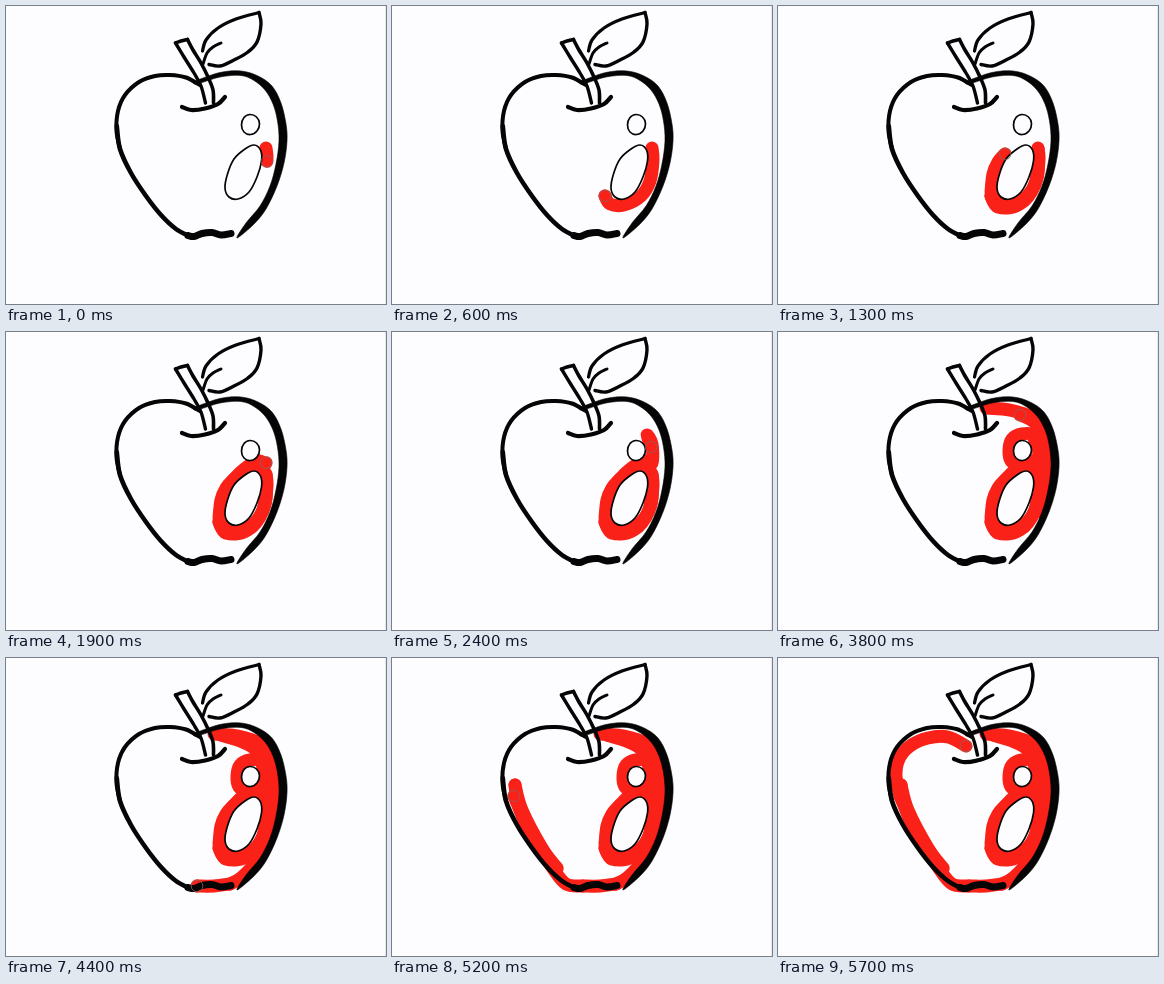
Write an HTML page that moves like this. It is 380 by 298 pixels and loops after 5.8 s.

```html
<!DOCTYPE html>
<html lang="en">
<head>
<meta charset="utf-8">
<title>Colouring an apple</title>
<style>
  html, body { margin: 0; width: 100%; height: 100%; overflow: hidden; background: #fdfcfe; }
  svg { display: block; width: 100%; height: 100%; }
  path { fill: none; stroke-linecap: round; stroke-linejoin: round; }
  #paint path { stroke: #fa2119; stroke-width: 13; }
  #ink path { stroke: #050505; }
  #ink .solid { fill: #050505; stroke-width: .6; }
  #ink .gloss { fill: #fdfcfe; stroke-width: 1.7; }
  #cursor { fill: none; stroke: #8d6260; stroke-width: .8; }
</style>
</head>
<body>
<svg viewBox="0 0 380 298" preserveAspectRatio="none">
  <path d="M379.5 0V298" stroke="#e9e7eb"/>
  <g id="paint"></g>
  <g id="ink"></g>
  <circle id="cursor" r="5.8"/>
</svg>
<script>
const LOOP = 5800, STEP = 100;
const $ = id => document.getElementById(id);

// Smooth curve through a list of points
function curve(text, closed) {
  const p = text.split(' ').map(s => s.split(',').map(Number));
  const n = p.length;
  const at = i => closed ? p[(i + n) % n] : p[Math.max(0, Math.min(n - 1, i))];
  let d = 'M' + p[0];
  for (let i = 0; i < (closed ? n : n - 1); i++) {
    const [a, b, c, e] = [at(i - 1), at(i), at(i + 1), at(i + 2)];
    const h1 = b.map((v, k) => v + (c[k] - a[k]) / 6);
    const h2 = c.map((v, k) => v - (e[k] - b[k]) / 6);
    d += `C${h1} ${h2} ${c}`;
  }
  return d + (closed ? 'Z' : '');
}

function addPath(parent, d, width, cls) {
  const el = document.createElementNS('http://www.w3.org/2000/svg', 'path');
  el.setAttribute('d', d);
  if (width) el.style.strokeWidth = width;
  if (cls) el.setAttribute('class', cls);
  parent.appendChild(el);
  return el;
}

const ink = (text, width) => addPath($('ink'), curve(text), width);
const shape = (text, cls) => addPath($('ink'), curve(text, true), 0, cls);

// Highlights
shape('244,108.5 250.5,111 253.5,117.5 251,125 244.5,128.5 238,126 235.5,119 238,111.5', 'gloss');
shape('239,143 228,153 221.5,168 219,182 223,191 232,193 243,186 251,171 255.5,155 254.5,144 248,139', 'gloss');

// Apple body
ink('194,79 180,71.5 164,69 149,70 133,76 119,89 112,105 110.5,125 114,143', 4);
ink('110.8,120 114,143 125,167 140,190 155,209 170,223 184,230.5', 4.6);
ink('182,229.5 188,230.5 196,227.5 206,226.5 215,229 225,227.5', 7);
shape('190,75 214,66.5 235,65 252,70 266,80 275,97 280,118 281,135 278,157 271,180 260,203 248,218 231,232 ' +
  '240,217 254,200 264,180 270,158 273,135 271.5,115 267,98 259,84 248,74.5 235,69.5 214,71 191,78', 'solid');

// Stem and hollow
ink('169.5,37 175,35 181.5,33.5', 3.6);
ink('169.5,37 178,51 188,67 195,80 199.5,97', 3.4);
ink('181.5,33.5 187,44 195,57 202,71 207,84 207.5,97', 3.6);
ink('176,101 185,104 199,102.5 212,98 219,91', 4.2);

// Leaf
ink('196.5,45 200,34 212,22 230,13 253,6.5', 3.2);
ink('253,6.5 255,18 251,36 242,46 228,54 214,60 203,58.5', 3.4);
ink('197,58 201,47 207,41 215,37', 3);

// Brush strokes: start ms, end ms, points
const strokes = [
  [-100, 600, '260,142 261,154 258,175 249,190 232,199 218,198 213,190'],
  [600, 1100, '213,190 226,201 246,195 259,172 260,143 257,178 240,199 220,201 213,190'],
  [1100, 1300, '213,186 215,168 220,156 227,148'],
  [1300, 1800, '227,148 236,139 247,132 258,139 259,148 257,132 253,129'],
  [1800, 2400, '253,129 260,131 260,112 255,103 259,115'],
  [2400, 2900, '259,115 255,103 244,102 234,107 231,118 233,129 240,133'],
  [3000, 3200, '208,76 225,77 240,80 255,85'],
  [3200, 3600, '255,85 264,98 268,120 268,145 263,180'],
  [3600, 4200, '263,180 267,140 258,92 215,77 250,92 261,130 262,175 250,203 236,219 224,226'],
  [4200, 4400, '224,226 208,228 191,228'],
  [4400, 4800, '191,228 174,226 160,209 145,185 132,162 125,140 123,127'],
  [4800, 5200, '123,127 130,152 150,190 165,210 140,178 122,138'],
  [5200, 5700, '122,138 118,118 121,101 132,88 150,80 170,79 188,88']
].map(([from, to, text]) => {
  const el = addPath($('paint'), curve(text));
  return { from, to, el, size: el.getTotalLength() };
});

function render(time) {
  const now = Math.floor(time % LOOP / STEP) * STEP;
  for (const { from, to, el, size } of strokes) {
    el.style.display = now < from ? 'none' : '';
    if (now < from) continue;
    const drawn = size * Math.min(1, (now - from) / (to - from));
    el.style.strokeDasharray = `${Math.max(.01, drawn)} ${size + 20}`;
    const tip = el.getPointAtLength(drawn);
    $('cursor').setAttribute('cx', tip.x);
    $('cursor').setAttribute('cy', tip.y);
  }
}

const begin = performance.now();
function tick() {
  render(performance.now() - begin);
  requestAnimationFrame(tick);
}
tick();
</script>
</body>
</html>
```
